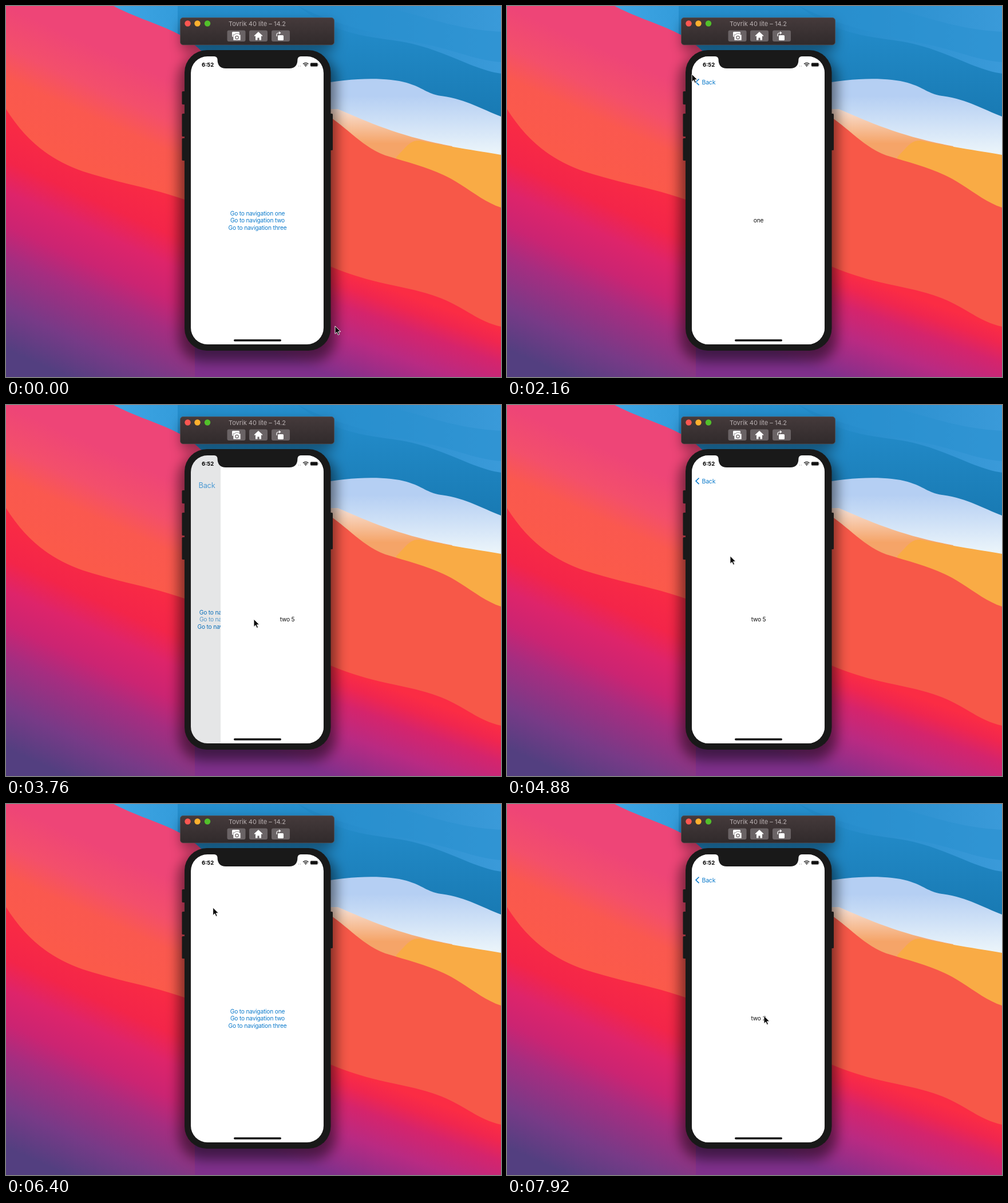
An HTML page that plays this animation: 865 px wide and 648 px high, repeating every 8 s.

```html
<!DOCTYPE html>
<html lang="en">
<head>
<meta charset="utf-8">
<title>Navigation demo</title>
<style>
  html, body { margin: 0; width: 100%; height: 100%; overflow: hidden; background: #1a7fb8; }
  svg { display: block; width: 865px; height: 648px; }
  text { font-family: Inter, Roboto, sans-serif; font-size: 10.2px; letter-spacing: -.2px; }
  .mid { text-anchor: middle; }
  .link { fill: #0b7acb; }
</style>
</head>
<body>
<svg viewBox="0 0 865 648">
  <defs>
    <linearGradient id="coral" gradientUnits="userSpaceOnUse" x1="0" y1="0" x2="-224" y2="499">
      <stop offset="0" stop-color="#ee4577"/><stop offset=".12" stop-color="#f34f6b"/>
      <stop offset=".21" stop-color="#fa584f"/><stop offset=".36" stop-color="#fb5a4a"/>
    </linearGradient>
    <linearGradient id="dusk" gradientUnits="userSpaceOnUse" x1="0" y1="0" x2="-224" y2="499">
      <stop offset=".3" stop-color="#fb2c43"/><stop offset=".45" stop-color="#f32549"/>
      <stop offset=".54" stop-color="#de246a"/><stop offset=".64" stop-color="#cb2472"/>
      <stop offset=".73" stop-color="#a62d80"/><stop offset=".88" stop-color="#773a87"/>
      <stop offset="1" stop-color="#533f80"/>
    </linearGradient>
    <linearGradient id="duskRight" gradientUnits="userSpaceOnUse" x1="567" y1="455" x2="506" y2="623">
      <stop offset="0" stop-color="#fb2c44"/><stop offset=".14" stop-color="#f0264f"/>
      <stop offset=".32" stop-color="#d5246c"/><stop offset=".6" stop-color="#b92a82"/>
      <stop offset="1" stop-color="#80308c"/>
    </linearGradient>
    <linearGradient id="sky" x2="1">
      <stop offset="0" stop-color="#62bbef"/><stop offset=".25" stop-color="#3ba3e2"/>
      <stop offset=".6" stop-color="#2189c8"/><stop offset="1" stop-color="#3a9ad9"/>
    </linearGradient>
    <linearGradient id="deep" x2="0" y2="1">
      <stop offset="0" stop-color="#258fce"/><stop offset="1" stop-color="#1879b2"/>
    </linearGradient>
    <linearGradient id="mist" x2="0" y2="1">
      <stop offset=".2" stop-color="#b5cff3"/><stop offset=".85" stop-color="#e9f3fa"/>
    </linearGradient>
    <linearGradient id="peach" x2="0" y2="1">
      <stop offset="0" stop-color="#f8e0d4"/><stop offset=".5" stop-color="#f5a468"/>
    </linearGradient>
    <linearGradient id="chrome" x2="0" y2="1">
      <stop offset="0" stop-color="#453a3b"/><stop offset="1" stop-color="#302a2b"/>
    </linearGradient>
    <filter id="soft" x="-20%" y="-20%" width="140%" height="140%"><feGaussianBlur stdDeviation="11"/></filter>
    <clipPath id="screen"><rect x="323" y="88" width="232" height="503" rx="29"/></clipPath>
  </defs>

  <g id="wallpaper">
    <rect width="865" height="648" fill="url(#sky)"/>
    <path fill="url(#deep)" d="M300 0 H510 C590 60 650 52 710 66 S820 112 865 118 V200 H300Z"/>
    <path fill="#2b91d0" opacity=".6" d="M510 0 C580 35 650 50 720 64 S820 95 865 98 V45 C760 40 700 0 620 0Z"/>
    <path fill="url(#mist)" d="M540 138 C600 125 665 124 700 134 C730 143 735 153 760 157 C805 163 830 180 865 193 V275 H540Z"/>
    <path fill="url(#peach)" d="M540 180 H580 C640 206 690 228 780 245 L760 300 H540Z"/>
    <path fill="#f9ab45" d="M682 264 C700 245 706 235 722 235 C770 245 825 253 865 260 V370 H682Z"/>
    <path fill="#f75848" d="M540 178 C590 203 618 245 663 261 C715 277 755 286 793 311 C820 328 840 344 865 352 V648 H540Z"/>
    <path fill="url(#coral)" d="M0 0 H188 C230 22 270 32 305 51 C335 67 360 100 400 130 V648 H0Z"/>
    <path fill="url(#dusk)" d="M0 180 C35 235 75 268 135 289 C200 310 255 318 312 338 L440 390 V648 H0Z"/>
    <path fill="url(#duskRight)" d="M330 380 L567 455 C640 486 690 487 745 505 S820 550 865 560 V648 H330Z"/>
  </g>

  <g filter="url(#soft)">
    <rect x="302" y="86" width="275" height="535" rx="42" opacity=".5"/>
    <rect x="306" y="30" width="267" height="48" rx="6" opacity=".42"/>
  </g>

  <g id="toolbar">
    <rect x="304.5" y="20.5" width="269" height="47.500" rx="5" fill="url(#chrome)" stroke="#5a4e50" stroke-width=".7"/>
    <circle cx="317.500" cy="30.500" r="5.200" fill="#fb5651"/>
    <circle cx="334.500" cy="30.500" r="5.200" fill="#fcb02e"/>
    <circle cx="352" cy="30.500" r="5.200" fill="#52c02b"/>
    <text class="mid" x="439" y="34.500" fill="#b9b1b2" style="font-size:11px;letter-spacing:0">Tovrik 40 lite – 14.2</text>
    <g fill="#6a6365">
      <rect x="386.500" y="42.500" width="32" height="19.500" rx="3"/>
      <rect x="425" y="42.500" width="32" height="19.500" rx="3"/>
      <rect x="464" y="42.500" width="32" height="19.500" rx="3"/>
    </g>
    <g fill="#fff">
      <rect x="395" y="45" width="13" height="9" rx="1.500"/>
      <path d="M397 50 h3 l1.500 -2 h5 l1.500 2 h2 v10 h-13z" stroke="#6a6365" stroke-width=".7"/>
      <circle cx="403.500" cy="55" r="2.700" fill="none" stroke="#6a6365" stroke-width="1.200"/>
      <path d="M441 45 l7.500 7 -1 1 -1.500 -1 v7.500 h-3.500 v-4 h-3 v4 H436 v-7.500 l-1.500 1 -1 -1z"/>
      <rect x="475" y="51" width="10" height="9" rx="1.500"/>
      <path d="M473 53 v-3 q0 -3 4 -3 h2 m-2 -2 l2.500 2 -2.500 2" fill="none" stroke="#fff" stroke-width="1.200"/>
    </g>
  </g>

  <g id="phone" fill="#191919">
    <rect x="307.500" y="149" width="8" height="23" rx="1.500"/>
    <rect x="307.500" y="188" width="8" height="40" rx="1.500"/>
    <rect x="307.500" y="231" width="8" height="39" rx="1.500"/>
    <rect x="563" y="188" width="8" height="64" rx="1.500"/>
    <rect x="312" y="77" width="255.500" height="525" rx="39"/>
  </g>

  <g clip-path="url(#screen)">
    <rect x="323" y="88" width="232" height="503" fill="#fff"/>
    <g id="home">
      <text class="mid link" x="439.500" y="365.500">Go to navigation one</text>
      <text class="mid link" x="439.500" y="378">Go to navigation two</text>
      <text class="mid link" x="439.500" y="390.500">Go to navigation three</text>
    </g>
    <rect id="dim" x="323" y="88" width="232" height="503" fill="#00121c"/>
    <g id="detail">
      <rect x="323" y="88" width="234" height="503" fill="#fff"/>
      <text id="label" class="mid" x="439.500" y="378" fill="#111"></text>
    </g>
    <path id="chevron" d="M335.500 127.500 l-5.500 5.300 5.500 5.300" fill="none" stroke="#0b7acb" stroke-width="1.600"/>
    <text id="back" class="link" style="font-size:10.500px">Back</text>
    <text x="342" y="105.500" style="font-size:9.500px;font-weight:700;letter-spacing:0">6:52</text>
    <g fill="#aaa"><circle cx="511.500" cy="105" r=".7"/><circle cx="514.500" cy="105" r=".7"/></g>
    <g fill="none" stroke="#111" stroke-width="1.400">
      <path d="M519 101.300 q4.700 -3.800 9.400 0 M520.800 103.300 q2.900 -2.300 5.800 0"/>
      <path d="M522.600 104.600 h2.200" stroke-width="1.800"/>
    </g>
    <rect x="531.800" y="99.300" width="13" height="6.400" rx="1.800" fill="#111" stroke="#aaa" stroke-width=".6"/>
    <rect x="545.500" y="101.500" width="1" height="2" fill="#999"/>
    <path fill="#191919" d="M364 86 V88 Q369 88.500 369.500 93 Q369.500 109 384 109 H495 Q509.500 109 509.500 93 Q510 88.500 515 88 V86Z"/>
    <rect x="398" y="582.300" width="83" height="3.400" rx="1.700" fill="#111"/>
  </g>

  <path id="cursor" d="M0 0 V13.500 L3.200 10.700 L5.300 15.500 L7.600 14.500 L5.500 9.800 H9.800Z" fill="#0a0a0a" stroke="#fff" stroke-width=".9"/>
</svg>

<script>
const LOOP = 8000, STEP = 80, WIDTH = 232;

// Pushes name the tapped row and the page title; pops have neither.
const transitions = [
  { at: 930, row: 0, title: 'one' },
  { at: 2400 },
  { at: 3618, row: 1, title: 'two 5' },
  { at: 5938 },
  { at: 7067, row: 1, title: 'two 2' },
];

// Pointer stops: time, x, y.
const pointer = [
  [0, 575, 559], [880, 481, 362], [1280, 481, 362], [2160, 323, 119],
  [2400, 334, 129], [2720, 334, 129], [3520, 433, 374], [4000, 433, 374],
  [5840, 341, 138], [6160, 341, 138], [7040, 454, 373], [7520, 454, 373], [7920, 449, 370],
];

const el = id => document.getElementById(id);
const rows = el('home').children;
const clamp = v => Math.max(0, Math.min(1, v));
const mix = (a, b, k) => a + (b - a) * k;
const smooth = k => k * k * (3 - 2 * k);
const move = (id, x, y = 0, scale = 1) =>
  el(id).setAttribute('transform', `translate(${x} ${y}) scale(${scale})`);

// Critically damped spring, snapped once it has nearly settled.
function spring(ms) {
  const x = Math.max(0, ms) * 0.02;
  const k = 1 - (1 + x) * Math.exp(-x);
  return k > 0.985 ? 1 : k;
}

function pointerAt(t) {
  const i = pointer.findIndex(p => p[0] > t);
  if (i < 0) return pointer.at(-1).slice(1);
  const [a, b] = [pointer[i - 1], pointer[i]];
  const k = smooth((t - a[0]) / (b[0] - a[0]));
  return [mix(a[1], b[1], k), mix(a[2], b[2], k)];
}

function draw(t) {
  let open = 0, title = '';
  const fade = [1, 1, 1];
  for (const { at, row, title: name } of transitions) {
    const age = t - at;
    if (name && age > -90) fade[row] = mix(0.35, 1, clamp((age - 100) / 90));
    if (age < 0) continue;
    open = name ? spring(age) : 1 - spring(age);
    title = name || title;
  }

  move('home', -0.3 * WIDTH * open);
  [...rows].forEach((row, i) => row.setAttribute('opacity', fade[i]));
  el('dim').setAttribute('opacity', 0.13 * open);
  move('detail', WIDTH * (1 - open));
  el('label').textContent = title;

  const grow = clamp((1 - open) * 4.5);
  move('back', 340.5 - 4 * grow, 136.5 + 8 * grow, 1 + 0.22 * grow);
  el('back').setAttribute('opacity', clamp((open - 0.6) / 0.25));
  el('chevron').setAttribute('opacity', clamp((open - 0.85) / 0.15));
  move('cursor', ...pointerAt(t));
}

function tick(now) {
  const t = now % LOOP;
  draw(t - t % STEP);
  requestAnimationFrame(tick);
}
draw(0);
requestAnimationFrame(tick);
</script>
</body>
</html>
```
